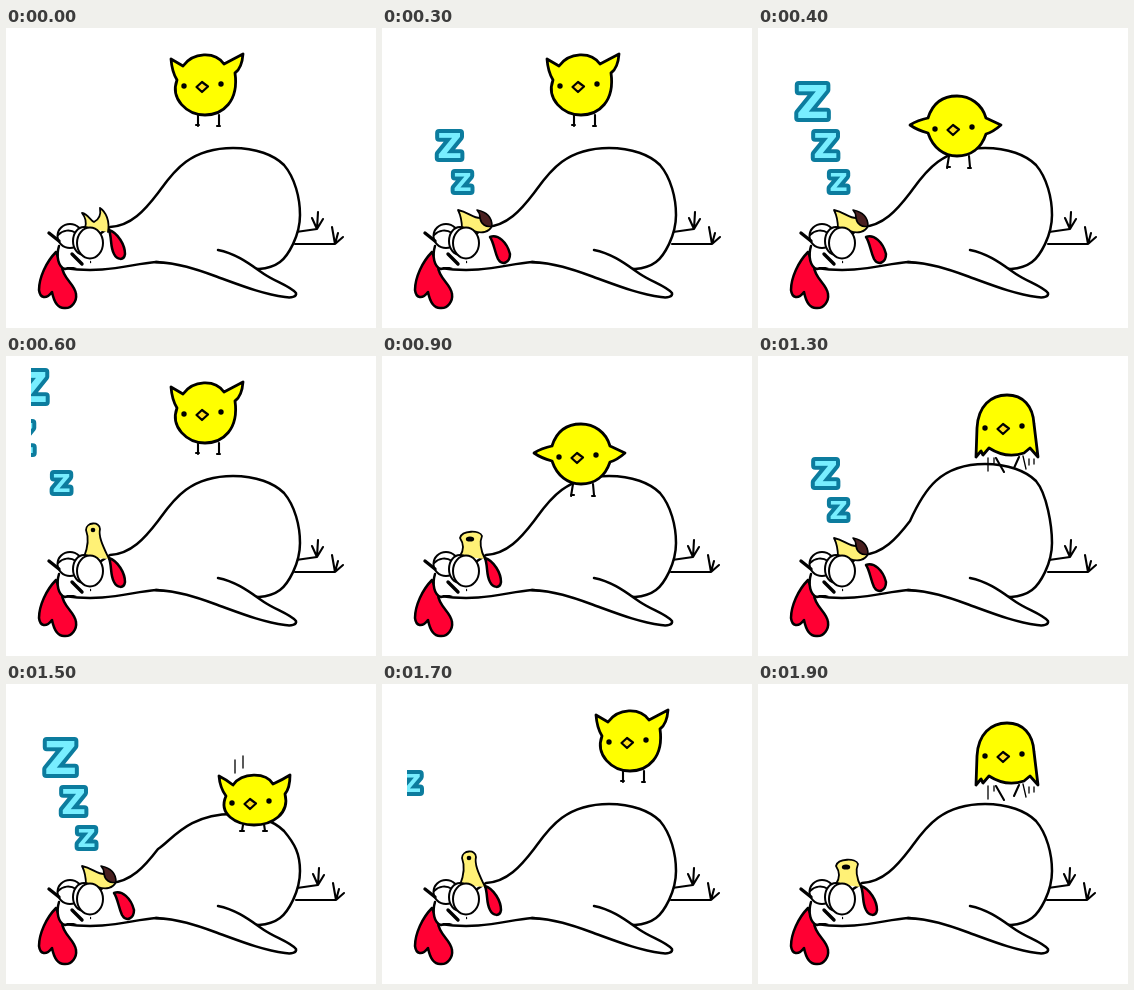
Animation of 370 by 300 pixels, one loop 2000 ms. Source, as an HTML page:

```html
<!DOCTYPE html>
<html lang="en">
<head>
<meta charset="utf-8">
<title>Sleeping hen and bouncing chick</title>
<style>
  html, body { margin: 0; width: 100%; height: 100%; overflow: hidden; background: #fff; }
  svg { display: block; width: 100vw; height: 100vh; }
  .ink { fill: none; stroke: #000; stroke-width: 2.5; stroke-linecap: round; stroke-linejoin: round; }
  .white { fill: #fff; }
  .red { fill: #ff0033; }
  .horn { fill: #fff176; stroke-width: 1.8; }
  .dark { fill: #4a2020; stroke-width: 1.6; }
  .yellow { fill: #ff0; stroke-width: 2.8; }
  .nib { fill: #ffdf20; stroke-width: 2.2; }
  .eye { stroke-width: 2; }
  .leg { stroke-width: 2.1; }
  .thin { stroke-width: 1.3; }
  .lash { stroke-width: 3.4; }
  .z { font: bold 40px "DejaVu Sans", sans-serif; text-anchor: middle; fill: #78eeff;
       stroke: #0c7c9e; stroke-width: 8; stroke-linejoin: round; paint-order: stroke; }
</style>
</head>
<body>
<svg viewBox="0 0 370 300">
  <clipPath id="edge"><path d="M25 0H370V300H25Z"/></clipPath>
  <g id="feet" class="ink leg">
    <path d="M290 204L311 201M306 190L311 201M312 184L311 201M317 191L311 201"/>
    <path d="M289 216H329M326 199L329 216M332 205L329 216M337 209L329 216"/>
  </g>
  <path id="body" class="ink white"/>
  <path class="ink white" d="M212 222C232 226 246 238 258 246C270 254 284 258 290 265C291 269 285 270 279 269C256 266 234 257 209 248C190 241 172 235 150 234"/>
  <path class="ink red" d="M50 224C40 234 33 250 33 262C34 270 40 272 46 264C48 274 52 280 58 280C66 281 71 273 70 266C69 256 56 250 56 238Z"/>
  <path class="ink white" d="M53 218C50 228 52 239 59 241L84 234"/>
  <path d="M54 216H84V239H60Z" fill="#fff"/>
  <path id="lobe" class="ink red"/>
  <g id="beak"></g>
  <g class="ink eye">
    <ellipse class="white" cx="64" cy="208" rx="12.5" ry="12"/>
    <path d="M52 207C57 202 64 201 70 205"/>
    <ellipse class="white" cx="78" cy="213" rx="11" ry="14"/>
    <ellipse class="white" cx="84" cy="215" rx="13" ry="15.5"/>
    <path class="lash" d="M43 205L53 213M66 226L76 236"/>
  </g>
  <g id="chick"></g>
  <g id="snore" clip-path="url(#edge)"></g>
</svg>
<script>
const STEP = 100;
const $ = id => document.getElementById(id);
const path = (cls, d) => `<path class="ink ${cls}" d="${d}"/>`;

// Hen outline: the back rises and sinks while the neck, belly and rump stay put.
const hen = lift =>
  `M104 199C125 198 139 182 152 165C166 ${146 - lift} 182 ${120 - lift} 227 ${120 - lift}` +
  `C250 ${120 - lift} 268 ${127 - lift} 278 ${137 - lift}C289 ${150 - lift} 294 170 294 187` +
  `C294 208 282 228 274 234Q266 240 253 241L150 234C124 236 100 246 58 240L82 214Z`;

const beaks = {
  ajar: path('horn', 'M79 200C81 194 80 190 76 185C82 186 84 192 88 194C94 191 95 186 94 180C100 184 104 193 102 204'),
  open: path('horn', 'M80 201C80 194 79 188 76 182C86 184 91 190 98 190L110 198C107 204 100 206 92 203') +
        path('dark', 'M95 182C105 184 110 190 110 198C104 200 99 196 98 190Q98 185 95 182Z'),
  tall: path('horn', 'M78 201C82 191 83 182 80 174C80 166 94 165 94 173C92 181 98 192 103 203') +
        '<circle cx="87" cy="174" r="2.3"/>',
  round: path('horn', 'M78 200C82 194 82 188 78 182C80 174 98 174 100 180C97 187 99 195 103 203') +
        '<ellipse cx="88" cy="183" rx="4.2" ry="2.6"/>'
};

const face = (x, y) =>
  `<circle cx="${x - 18}" cy="${y}" r="2.7"/><circle cx="${x + 19}" cy="${y - 2}" r="2.7"/>` +
  path('nib', `M${x - 5.5} ${y + 1}l5.5-5 6 4.5-6 5.5Z`);

// Chick poses are drawn around the middle of the body.
const poses = {
  top: path('yellow', 'M-34-26L-22-19C-12-33 10-34 19-21L38-31Q37-17 30-12C34 16 18 30 0 30S-35 14-28-5Q-33-13-34-26Z') +
       path('leg', 'M-7 30V41M-9 40H-6M14 30V41M12 41H15') + face(-3, 1),
  stand: path('yellow', 'M-29-8C-24-24-13-30 0-30S25-22 29-8L44-1Q36 6 29 8C24 23 13 30 0 30S-24 22-29 7Q-40 4-47-1Q-39-6-29-8Z') +
       path('leg', 'M-8 30L-10 42M-10 41H-7M12 30L13 41M11 42H14') + face(-4, 3),
  rise: path('yellow', 'M-30 31L-29 2C-28-20-15-31 1-31S27-20 28-2L32 31L24 22L18 27Q0 33-17 22L-23 29L-25 25Z') +
       path('leg', 'M-10 32L-2 46M13 31L8 42') +
       path('thin', 'M-18 32V45M-12 32V37M17 30L20 43M23 33V39M28 33V38') + face(-3, 2),
  squash: path('yellow', 'M-35-24Q-27-20-21-15C-12-28 12-28 19-16Q28-20 36-25Q36-12 31-6C36 14 18 25 0 25S-36 14-28-4Q-34-12-35-24Z') +
       path('leg', 'M-11 25L-12 31M-14 31H-10M10 24L11 31M9 31H13') +
       path('thin', 'M-19-40V-27M-11-44V-32') + face(-4, 3)
};
const heights = { top: 57, stand: 98, rise: 70, squash: 116 };

const leftHops = 'top stand rise top stand rise top stand top stand'.split(' ');
const rightHops = 'rise top squash rise top squash rise top squash rise'.split(' ');
const hops = [...leftHops, ...rightHops];
const breaths = 'ajar ajar open open open open tall tall round round'.split(' ');

// Each letter: centre, baseline, size.
const trail = [[80.5, 163, 25], [67.5, 130, 34], [54.5, 90, 45]];
const letters = [[], [], trail.slice(0, 1), trail.slice(0, 2), trail, trail,
  [[55.5, 136, 25], [14, 97, 40], [27, 46, 40]], [[30, 108, 25]], [], []];

function backLift(i, pose) {
  if (pose === 'squash') return -10;
  return i > 12 && i < 19 && pose === 'rise' ? 12 : 0;
}

function draw(i) {
  const breath = i % 10, pose = hops[i], mouth = breaths[breath];
  const inhaling = mouth === 'open';
  $('body').setAttribute('d', hen(backLift(i, pose)));
  $('lobe').setAttribute('d', inhaling
    ? 'M108 209C116 206 125 214 128 226C128 235 120 238 116 231C112 222 112 215 108 209Z'
    : 'M103 202C112 205 119 217 119 226C118 233 111 232 108 226C104 219 106 210 103 202Z');
  $('feet').setAttribute('transform', inhaling ? 'translate(1 0)' : '');
  $('beak').innerHTML = beaks[mouth];
  $('chick').innerHTML = poses[pose];
  $('chick').setAttribute('transform', `translate(${i < 10 ? 199 : 248} ${heights[pose]})`);
  $('snore').innerHTML = letters[breath].map(([x, y, size]) =>
    `<text class="z" x="${x}" y="${y}" style="font-size:${size}px">Z</text>`).join('');
}

let shown = -1;
const start = performance.now();
function tick() {
  const i = Math.floor((performance.now() - start) / STEP) % hops.length;
  if (i !== shown) draw(shown = i);
  requestAnimationFrame(tick);
}
tick();
</script>
</body>
</html>
```
